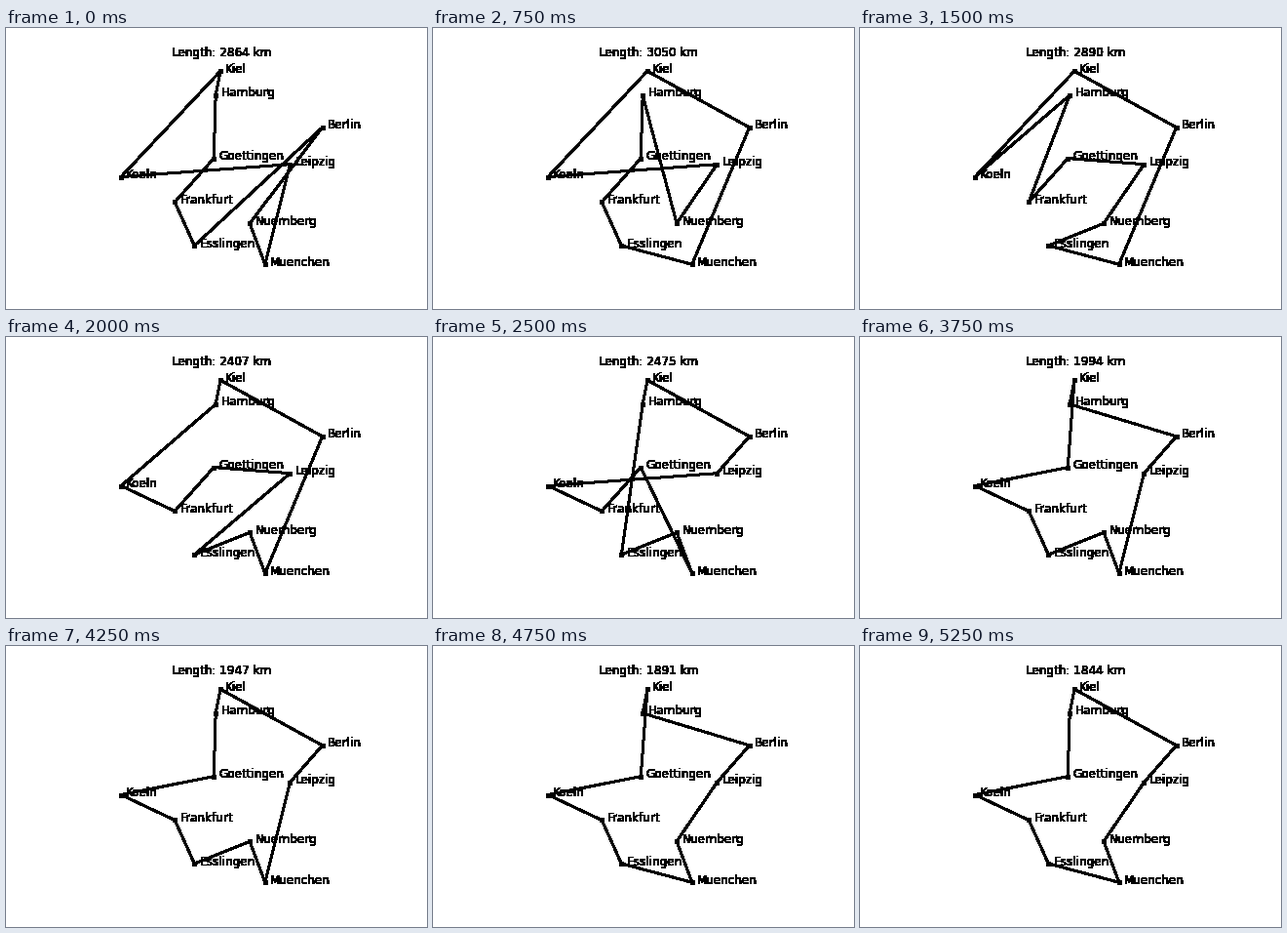
These frames come from a looping animation (432x288 px, 6250 ms). A matplotlib script:

```python
from math import asin, cos, radians, sin, sqrt

import numpy as np
import matplotlib.pyplot as plt
from matplotlib.animation import FuncAnimation

W, H, DPI = 432, 288, 72
TICK, TICKS = 250, 25
EARTH_RADIUS = 6378

plt.rcParams["font.family"] = "DejaVu Sans"
plt.rcParams["font.size"] = 12

# name: (latitude, longitude), listed in the order of the first tour
CITIES = {
    "Kiel": (54.32, 10.14),
    "Hamburg": (53.55, 9.99),
    "Goettingen": (51.53, 9.93),
    "Frankfurt": (50.13, 8.68),
    "Esslingen": (48.74, 9.31),
    "Berlin": (52.52, 13.405),
    "Nuernberg": (49.45, 11.08),
    "Muenchen": (48.14, 11.57),
    "Leipzig": (51.34, 12.37),
    "Koeln": (50.94, 6.96),
}

# One 2-opt step per tick: the stretch of the tour to reverse, or a pause
PAUSE, FLIP = None, (1, 8)
STEPS = [
    PAUSE, (1, 5), (2, 6), (2, 7),
    PAUSE, (6, 8), (4, 7), (8, 9), (3, 4), (2, 5), (3, 8), (5, 8), (3, 7),
    PAUSE, PAUSE, FLIP,
    PAUSE, FLIP, (3, 4), FLIP,
    PAUSE, FLIP,
]


def project(lat, lon, scale=32.05):
    return 118.05 + (lon - 6.96) * scale, 44.2 + (54.32 - lat) * scale


def distance(a, b):
    """Great-circle distance in km."""
    lat1, lon1, lat2, lon2 = map(radians, CITIES[a] + CITIES[b])
    h = (sin((lat2 - lat1) / 2) ** 2
         + cos(lat1) * cos(lat2) * sin((lon2 - lon1) / 2) ** 2)
    return 2 * EARTH_RADIUS * asin(sqrt(h))


def tour_at(tick):
    """The closed tour after all steps up to this tick."""
    tour = list(CITIES)
    for step in STEPS[:tick + 1]:
        if step:
            first, last = step
            tour[first:last + 1] = tour[first:last + 1][::-1]
    return tour + tour[:1]


def harden(img, dpi):
    """Turn every touched pixel plain black."""
    out = np.zeros_like(img)
    out[..., 3] = img[..., 3] > 0
    return out, 0, 0


POINTS = {name: project(*pos) for name, pos in CITIES.items()}

fig = plt.figure(figsize=(W / DPI, H / DPI), dpi=DPI, facecolor="white")
ax = fig.add_axes([0, 0, 1, 1])
ax.set_xlim(0, W)
ax.set_ylim(H, 0)
ax.axis("off")
ax.set_agg_filter(harden)

path, = ax.plot([], [], "ks-", lw=2, ms=4)
title = ax.text(221.4, 28.56, "", ha="center", va="baseline")
for name, (x, y) in POINTS.items():
    ax.text(x + 5.3, y + 1.5, name, va="baseline")


def update(tick):
    tour = tour_at(tick)
    path.set_data(*zip(*(POINTS[name] for name in tour)))
    length = sum(map(distance, tour, tour[1:]))
    title.set_text(f"Length: {int(length)} km")
    return path, title


anim = FuncAnimation(fig, update, frames=TICKS, interval=TICK,
                     repeat=True, repeat_delay=0, blit=False)
plt.show()
```
